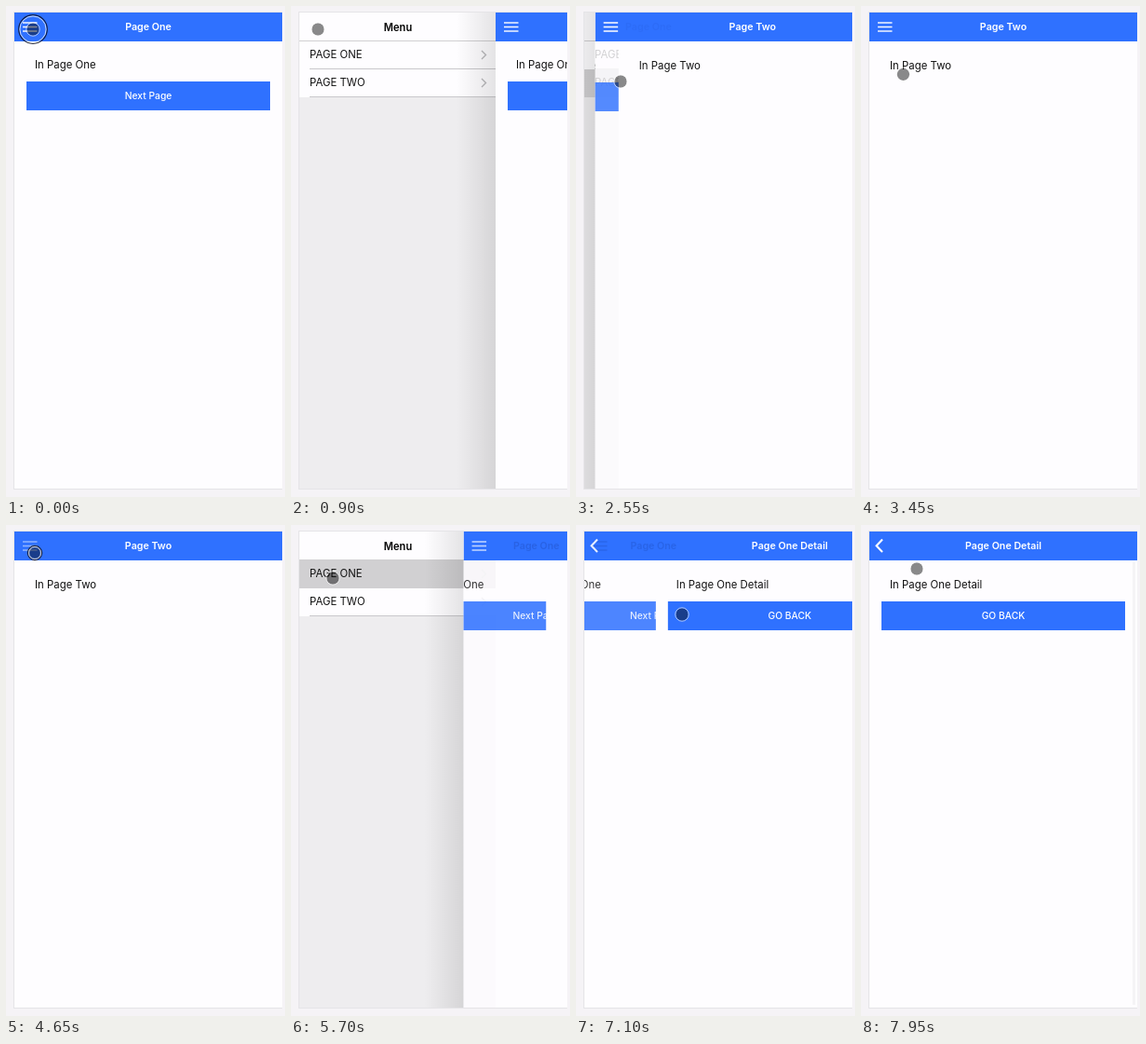
Animation of 300 by 527 pixels, one loop 8 s. Source, as an HTML page with a canvas:

```html
<!DOCTYPE html>
<html lang="en">
<head>
<meta charset="utf-8">
<title>Side menu navigation</title>
<style>
html, body { margin: 0; width: 100%; height: 100%; overflow: hidden; background: #f5f3f6; }
canvas { display: block; width: 300px; height: 527px; }
</style>
</head>
<body>
<canvas id="stage"></canvas>
<script>
const LOOP = 8000, W = 300, H = 527;
const L = 9, T = 7, R = 297, B = 518, BAR = 38, WIDTH = R - L, MENU = 211;
const BLUE = '#2f71ff', PAPER = '#fefdff', INK = '#111';
const FONT = 'Inter, "Liberation Sans", sans-serif';

const canvas = document.getElementById('stage');
const ctx = canvas.getContext('2d');
const dpr = window.devicePixelRatio || 1;
canvas.width = W * dpr;
canvas.height = H * dpr;

const PAGES = {
  one: { title: 'Page One', text: 'In Page One', button: 'Next Page', icon: 'menu' },
  two: { title: 'Page Two', text: 'In Page Two', icon: 'menu' },
  detail: { title: 'Page One Detail', text: 'In Page One Detail', button: 'GO BACK', icon: 'back' }
};

// Page changes; a reversed one slides the old page off to the right
const NAVS = [
  { at: 2333, from: 'one', to: 'two' },
  { at: 5634, from: 'two', to: 'one', reverse: true },
  { at: 6967, from: 'one', to: 'detail' }
];
const NAV_MS = 500, MENU_MS = 300, RING_MS = 200;
const MENU_MOVES = [{ open: 50, close: 2255 }, { open: 4715, close: 5550 }];
const CLICKS = [-150, 2140, 4640, 5450, 6900];

// time, x, y
const PATH = [
  [0, 29, 25], [900, 29, 25], [1700, 47, 82], [2550, 48, 81], [3250, 48, 81],
  [4100, 30, 27], [4500, 31, 30], [5020, 31, 30], [5220, 45, 57], [5750, 45, 57],
  [6250, 88, 89], [6500, 114, 96], [7250, 114, 96], [7700, 120, 107], [7950, 60, 47]
];

const clamp = v => Math.min(1, Math.max(0, v));

function bezier(x1, y1, x2, y2) {
  const at = (s, a, b) => 3 * (1 - s) * (1 - s) * s * a + 3 * (1 - s) * s * s * b + s * s * s;
  return x => {
    if (x <= 0) return 0;
    if (x >= 1) return 1;
    let lo = 0, hi = 1;
    for (let i = 0; i < 24; i++) {
      const mid = (lo + hi) / 2;
      if (at(mid, x1, x2) < x) lo = mid; else hi = mid;
    }
    return at(lo, y1, y2);
  };
}
const navEase = bezier(0.36, 0.66, 0.04, 1);
const menuEase = bezier(0, 0, 0.2, 1);

function rect(x, y, w, h, fill) {
  ctx.fillStyle = fill;
  ctx.fillRect(x, y, w, h);
}

function line(points, color, width) {
  ctx.strokeStyle = color;
  ctx.lineWidth = width;
  ctx.beginPath();
  points.forEach(([x, y]) => ctx.lineTo(x, y));
  ctx.stroke();
}

function circle(x, y, r, color, width) {
  ctx.beginPath();
  ctx.arc(x, y, r, 0, Math.PI * 2);
  if (width) {
    ctx.strokeStyle = color;
    ctx.lineWidth = width;
    ctx.stroke();
  } else {
    ctx.fillStyle = color;
    ctx.fill();
  }
}

function label(str, x, y, size, weight, color, align = 'left') {
  ctx.font = `${weight} ${size}px ${FONT}`;
  ctx.textAlign = align;
  ctx.fillStyle = color;
  ctx.fillText(str, x, y);
}

function clipped(x, y, w, h, draw) {
  ctx.save();
  ctx.beginPath();
  ctx.rect(x, y, w, h);
  ctx.clip();
  draw();
  ctx.restore();
}

function menuOffset(t) {
  const move = MENU_MOVES.find(m => t >= m.open && t < m.close + MENU_MS);
  if (!move) return 0;
  const k = t < move.close
    ? menuEase((t - move.open) / MENU_MS)
    : menuEase(1 - (t - move.close) / MENU_MS);
  return MENU * k;
}

function drawMenu(t) {
  rect(L, T, MENU, B - T, '#eeedef');
  rect(L, T, MENU, 91, PAPER);
  label('Menu', 115, 26.5, 11.1, 600, '#000', 'center');
  const pressed = t >= 5450 && t < 6000 ? 0 : t >= 2140 && t < 3000 ? 1 : -1;
  ['PAGE ONE', 'PAGE TWO'].forEach((name, i) => {
    const y = BAR + i * 30;
    if (i === pressed) rect(L, y, MENU, 30, '#d1d0d2');
    label(name, 20, y + 18.3, 11.4, 400, INK);
    line([[205, y + 10], [209.5, y + 14.5], [205, y + 19]], '#b9b8bb', 1.4);
    if (i !== pressed) rect(20, y + 29, MENU - 11, 1, '#c9c8cb');
  });
  rect(L, BAR - 1, MENU, 1, '#d0cfd1');
}

function drawContent(page, x, alpha, dy) {
  ctx.globalAlpha = alpha;
  rect(x + L, BAR, WIDTH, B - BAR, PAPER);
  label(page.text, x + 31, 67.3 + dy, 11.4, 400, INK);
  if (page.button) {
    rect(x + 22, 81 + dy, 262, 31, BLUE);
    label(page.button, x + 153, 100.4 + dy, 10.3, 500, '#fff', 'center');
  }
  ctx.globalAlpha = 1;
}

function drawTitle(page, x, color) {
  label(page.title, x + 153, 26.4, 10.7, 600, color, 'center');
}

function drawIcon(kind, x, color) {
  if (kind === 'back') {
    line([[x + 23, 15.5], [x + 16.6, 22.2], [x + 23, 28.9]], color, 2.1);
  } else {
    for (const y of [18, 22.5, 27]) line([[x + 18, y], [x + 33.5, y]], color, 1.4);
  }
}

const white = a => `rgba(255,255,255,${a})`;
const dark = a => `rgba(10,25,90,${a})`;

// Fading title or icon keeps a slight dark trace
function faded(p, draw) {
  draw(white(clamp(1 - 2 * p)));
  draw(dark(Math.min(0.16, 0.55 * (1 - p))));
}

function drawPages(t, off) {
  const nav = NAVS.filter(n => t >= n.at).pop();
  const dy = nav ? 1 : 0;
  const p = nav ? navEase((t - nav.at) / NAV_MS) : 1;
  const x = off;
  const current = PAGES[nav ? nav.to : 'one'];

  if (off > 0) {
    const shade = ctx.createLinearGradient(L + off - 42, 0, L + off, 0);
    shade.addColorStop(0, 'rgba(0,0,0,0)');
    shade.addColorStop(1, 'rgba(0,0,0,0.1)');
    rect(L + off - 42, T, 42, B - T, shade);
  }

  clipped(L + off, T, WIDTH - off, B - T, () => {
    rect(L + off, T, WIDTH, BAR - T, BLUE);
    if (p >= 1) {
      drawContent(current, x, 1, dy);
      drawTitle(current, x, '#fff');
      const pressed = t >= 4640 && t < 4850;
      drawIcon(current.icon, x, white(pressed ? 0.5 : 1));
      if (current.icon === 'back') rect(292, 40, 3, 475, 'rgba(0,0,0,0.035)');
      return;
    }
    const old = PAGES[nav.from];
    const q = nav.reverse ? 1 - p : p;
    const under = nav.reverse ? current : old;
    const over = nav.reverse ? old : current;
    const underX = x - 0.33 * WIDTH * q, overX = x + WIDTH * (1 - q);
    drawContent(under, underX, 1 - 0.2 * q, dy);
    drawContent(over, overX, 1, dy);
    faded(q, color => drawTitle(under, underX, color));
    drawTitle(over, overX, '#fff');
    if (under.icon === over.icon) {
      drawIcon(over.icon, x, white(nav.reverse ? 0.6 + 0.4 * p : 1));
    } else {
      faded(q, color => drawIcon(under.icon, x, color));
      drawIcon(over.icon, x, white(clamp(q * 1.2)));
    }
  });
}

function cursorAt(t) {
  const i = PATH.findIndex(k => k[0] > t);
  if (i < 0) return PATH[PATH.length - 1].slice(1);
  const a = PATH[i - 1], b = PATH[i];
  const u = (t - a[0]) / (b[0] - a[0]), k = u * u * (3 - 2 * u);
  return [a[1] + (b[1] - a[1]) * k, a[2] + (b[2] - a[2]) * k];
}

function drawCursor(t) {
  const [x, y] = cursorAt(t);
  circle(x, y, 6.7, 'rgba(0,0,0,0.46)');
  circle(x, y, 7.2, white(0.6), 1);
  const click = CLICKS.find(c => t >= c && t < c + RING_MS);
  if (click === undefined) return;
  const r = 7 + 11 * (t - click) / RING_MS;
  circle(x, y, r, 'rgba(10,15,35,0.85)', 1.2);
  circle(x, y, r - 1.2, white(0.75), 1);
}

function draw(t) {
  ctx.setTransform(dpr, 0, 0, dpr, 0, 0);
  rect(0, 0, W, H, '#f5f3f6');
  rect(L - 1, T - 1, WIDTH + 1, B - T + 2, '#e5e4e7');
  clipped(L, T, WIDTH, B - T, () => {
    rect(L, T, WIDTH, B - T, PAPER);
    const off = menuOffset(t);
    if (off > 0) drawMenu(t);
    drawPages(t, off);
  });
  drawCursor(t);
}

const start = performance.now();
function tick() {
  draw((performance.now() - start) % LOOP);
  requestAnimationFrame(tick);
}
tick();
</script>
</body>
</html>
```
